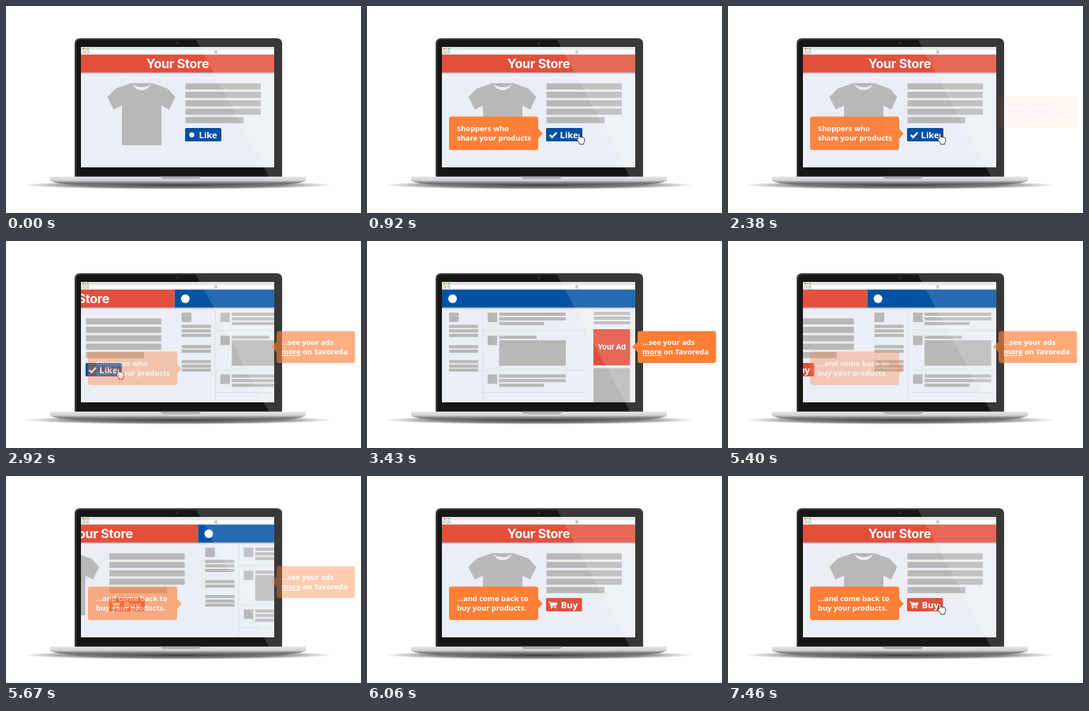
Recreate the animation shown at these times as an HTML page. Size 450x263 px, loop 8.86 s.

```html
<!DOCTYPE html>
<html lang="en">
<head>
<meta charset="utf-8">
<title>Store and social ad loop</title>
<style>
  html, body { margin: 0; width: 100%; height: 100%; overflow: hidden; background: #fff; }
  svg { display: block; width: 100vw; height: 100vh; }
  .head { font: 700 16px Inter, sans-serif; letter-spacing: -.2px; }
  .ad { font: 700 9.2px Inter, sans-serif; }
  .note { font: 700 9.4px "Open Sans", sans-serif; }
  .btn { font: 700 11.3px "Open Sans", sans-serif; }
  text { fill: #fff; }
</style>
</head>
<body>
<svg viewBox="0 0 450 263" xmlns="http://www.w3.org/2000/svg">
  <defs>
    <clipPath id="screen"><rect x="95" y="61.5" width="245" height="143.5"/></clipPath>
    <radialGradient id="floor">
      <stop offset="0" stop-color="#000" stop-opacity=".75"/>
      <stop offset=".65" stop-color="#000" stop-opacity=".5"/>
      <stop offset="1" stop-color="#000" stop-opacity="0"/>
    </radialGradient>
    <linearGradient id="metal" x2="0" y2="1">
      <stop offset="0" stop-color="#e6e6e8"/>
      <stop offset="1" stop-color="#cdcdd0"/>
    </linearGradient>
    <linearGradient id="under" x2="0" y2="1">
      <stop offset="0" stop-color="#b4b4b8"/>
      <stop offset="1" stop-color="#5c5c60"/>
    </linearGradient>
    <linearGradient id="drop" x2="0" y2="1">
      <stop offset="0" stop-color="#000" stop-opacity=".25"/>
      <stop offset="1" stop-color="#000" stop-opacity="0"/>
    </linearGradient>
  </defs>

  <rect width="450" height="263" fill="#fff"/>
  <ellipse cx="218" cy="227.5" rx="197" ry="5.5" fill="url(#floor)"/>

  <!-- laptop -->
  <path d="M87 217V48q0-7 7-7H343q7 0 7 7V217z" fill="#3a3a3b"/>
  <path d="M89 217V48.500q0-5.500 5.500-5.500H342.500q5.500 0 5.500 5.500V217z" fill="#161617"/>
  <circle cx="217.500" cy="47" r="1.600" fill="#3b3f48"/>
  <circle cx="217.500" cy="47" r=".7" fill="#0a0a0c"/>
  <path d="M56 222H380Q372 226.500 345 226.500H91Q64 226.500 56 222z" fill="url(#under)"/>
  <rect x="56" y="216.800" width="324" height="5.700" rx="1" fill="url(#metal)"/>
  <path d="M196 216.800H247q-1 3.200-4 3.200H200q-3 0-4-3.200z" fill="#b1b1b4"/>

  <!-- browser bar -->
  <rect x="95" y="52" width="245" height="10" fill="#e3e4e5"/>
  <rect x="106" y="56" width="158" height="4.500" fill="#fff"/>
  <rect x="268" y="56" width="71" height="4.500" fill="#fff"/>
  <rect x="264.500" y="56.500" width="3" height="3.500" fill="#b9bfc8"/>
  <rect x="97.500" y="56.500" width="3" height="3.500" fill="#c5dfc2"/>
  <rect x="102" y="56.500" width="3" height="3.500" fill="#c5dfc2"/>
  <circle cx="98" cy="54" r="1.100" fill="#e2614f"/>
  <circle cx="101" cy="54" r="1.100" fill="#e8b64a"/>
  <circle cx="104" cy="54" r="1.100" fill="#69b85c"/>

  <g clip-path="url(#screen)">
    <rect x="95" y="61" width="245" height="144" fill="#ebeef4"/>
    <g id="store">
      <rect x="95" y="84" width="245" height="3" fill="url(#drop)"/>
      <rect x="95" y="61.500" width="245" height="23" fill="#e2503c"/>
      <text class="head" x="217.500" y="79.300" text-anchor="middle">Your Store</text>
      <path d="M158.500 98H185.500L205 105 214.500 115.500 207 131.500 197 126.500V177H147V126.500L136.500 131.500 128.500 115.500 139 105z" fill="#b8b8b8"/>
      <path d="M160.500 99C164 109.500 180 109.500 183.500 99 179 104.500 165 104.500 160.500 99z" fill="#ebeef4"/>
      <g id="copy" fill="#b8b8b8"></g>
      <g id="like">
        <rect x="227" y="155" width="46" height="17" rx="1.500" fill="#004fa5"/>
        <circle id="badge" cx="235.500" cy="163.700" r="3.200" fill="#fff"/>
        <path id="tick" d="M231.700 163.800l3 3 5.600-6" fill="none" stroke="#fff" stroke-width="2.400"/>
        <text class="btn" x="244.500" y="167.800">Like</text>
      </g>
      <g id="buy">
        <rect x="227" y="155" width="45.500" height="17" rx="1.500" fill="#e2503c"/>
        <path d="M230 159.500h2l.6 1.200h9l-1.500 4h-6.300l.2 1h6v1h-7l-1.400-6H230z" fill="#fff"/>
        <circle cx="234" cy="167.300" r="1.100" fill="#fff"/>
        <circle cx="238.800" cy="167.300" r="1.100" fill="#fff"/>
        <text class="btn" x="245.700" y="167.800">Buy</text>
      </g>
      <path id="hand" d="M267.500 163.300q0-1.200 1.100-1.200t1.200 1.200v3.700q.1-1 1.100-.9t1 1q.1-.8 1.100-.6t.9 1.100q.3-.6 1.100-.3t.7 1.200v3q0 1.600-1 2.500v1.700h-5.200v-1.300l-3.300-4.400q-.6-1.100.2-1.500t1.100.4z" fill="#fff" stroke="#222" stroke-width=".8" stroke-linejoin="round"/>
    </g>
    <g id="feed">
      <rect x="95" y="84" width="245" height="3" fill="url(#drop)"/>
      <rect x="95" y="61.500" width="245" height="23" fill="#0052a5"/>
      <circle cx="108.500" cy="73.300" r="5.500" fill="#fff"/>
      <path d="M146.500 85V205M147 113.700H278M147 164H278M147 192.500H278" stroke="#dde0e6"/>
      <g id="posts" fill="#b8b8b8"></g>
      <rect x="287" y="112" width="46.500" height="46" fill="#e2503c"/>
      <text class="ad" x="310.300" y="138.300" text-anchor="middle">Your Ad</text>
    </g>
  </g>

  <path d="M241 43H342.500q5.500 0 5.500 5.500V217H333.200z" fill="#fff" opacity=".145"/>

  <g id="share">
    <use href="#left"/>
    <text class="note" x="114" y="158.600">Shoppers who</text>
    <text class="note" x="114" y="170.700">share your products</text>
  </g>
  <g id="ads">
    <path d="M346 114.500H439.500q3 0 3 3V152q0 3-3 3H346q-3 0-3-3V141l-7-6.500 7-6.500V117.500q0-3 3-3z" fill="#ff7f37"/>
    <text class="note" x="349" y="131.800">…see your ads</text>
    <text class="note" x="349" y="144"><tspan text-decoration="underline">more</tspan> on Tavoreda</text>
  </g>
  <g id="back">
    <path id="left" d="M107 140.500H214q3 0 3 3V156l5.700 6.200-5.700 6.200V180q0 3-3 3H107q-3 0-3-3V143.500q0-3 3-3z" fill="#ff7f37"/>
    <text class="note" x="114" y="158.600">…and come back to</text>
    <text class="note" x="114" y="170.700">buy your products.</text>
  </g>
</svg>
<script>
const LOOP = 8860, TICK = 30, WIDTH = 245;
const $ = id => document.getElementById(id);
const move = (id, x, y = 0) => $(id).setAttribute('transform', `translate(${x} ${y})`);
const fade = (id, a) => $(id).setAttribute('opacity', a);

function bar(parent, x, y, w, h = 4) {
  const r = document.createElementNS('http://www.w3.org/2000/svg', 'rect');
  Object.entries({ x, y, width: w, height: h }).forEach(([k, v]) => r.setAttribute(k, v));
  $(parent).append(r);
}

for (let i = 0; i < 5; i++) bar('copy', 227.5, 98.3 + i * 10.7, i < 4 ? 95.5 : 73.5, 7.8);

bar('posts', 104, 91, 12.3, 12);
[106.5, 112.2, 118, 132.3, 138, 151.3, 157, 162].forEach(y => bar('posts', 104, y, 37));
[91, 120.3, 169.5].forEach(y => bar('posts', 153, y, 12, 12));
[91, 169.5].forEach(y => {
  for (let i = 0; i < 3; i++) bar('posts', 167.5, y + i * 5.9, i < 2 ? 84.5 : 57);
});
bar('posts', 167.5, 120.3, 47.5);
bar('posts', 167.5, 126, 84.5, 32.5);
[90, 96, 102].forEach(y => bar('posts', 287.5, y, 46));
bar('posts', 287, 161.5, 46.5, 44);

// Stepped linear progress; `lead` is the step reached on the first tick.
function steps(t, start, n, lead = 1) {
  if (t < start) return 0;
  return Math.min(1, (Math.floor((t - start) / TICK) + lead) / n);
}

function draw(t) {
  const out = steps(t, 2440, 33), home = steps(t, 5100, 33);
  const slide = (out - home) * WIDTH;
  move('store', -slide);
  move('feed', WIDTH - slide);

  const second = t >= 5100;
  fade('like', second ? 0 : 1);
  fade('buy', second ? 1 : 0);

  const tick = steps(t, 650, 10);
  fade('badge', 1 - tick);
  fade('tick', tick);
  move('like', 0, Math.sin(Math.PI * tick));
  move('buy', 0, Math.sin(Math.PI * steps(t, 7190, 10)));

  const reach = second ? steps(t, 6520, 10) : steps(t, 150, 10);
  fade('hand', reach > 0 ? 1 : 0);
  move('hand', 75 * (1 - reach), 7 * (1 - reach));

  const swap = steps(t, 2380, 32, 2);
  fade('share', steps(t, 30, 14) * (1 - swap));
  fade('ads', swap * (1 - home));
  fade('back', home);
}

function loop(now) {
  draw(now % LOOP);
  requestAnimationFrame(loop);
}
draw(0);
requestAnimationFrame(loop);
</script>
</body>
</html>
```
